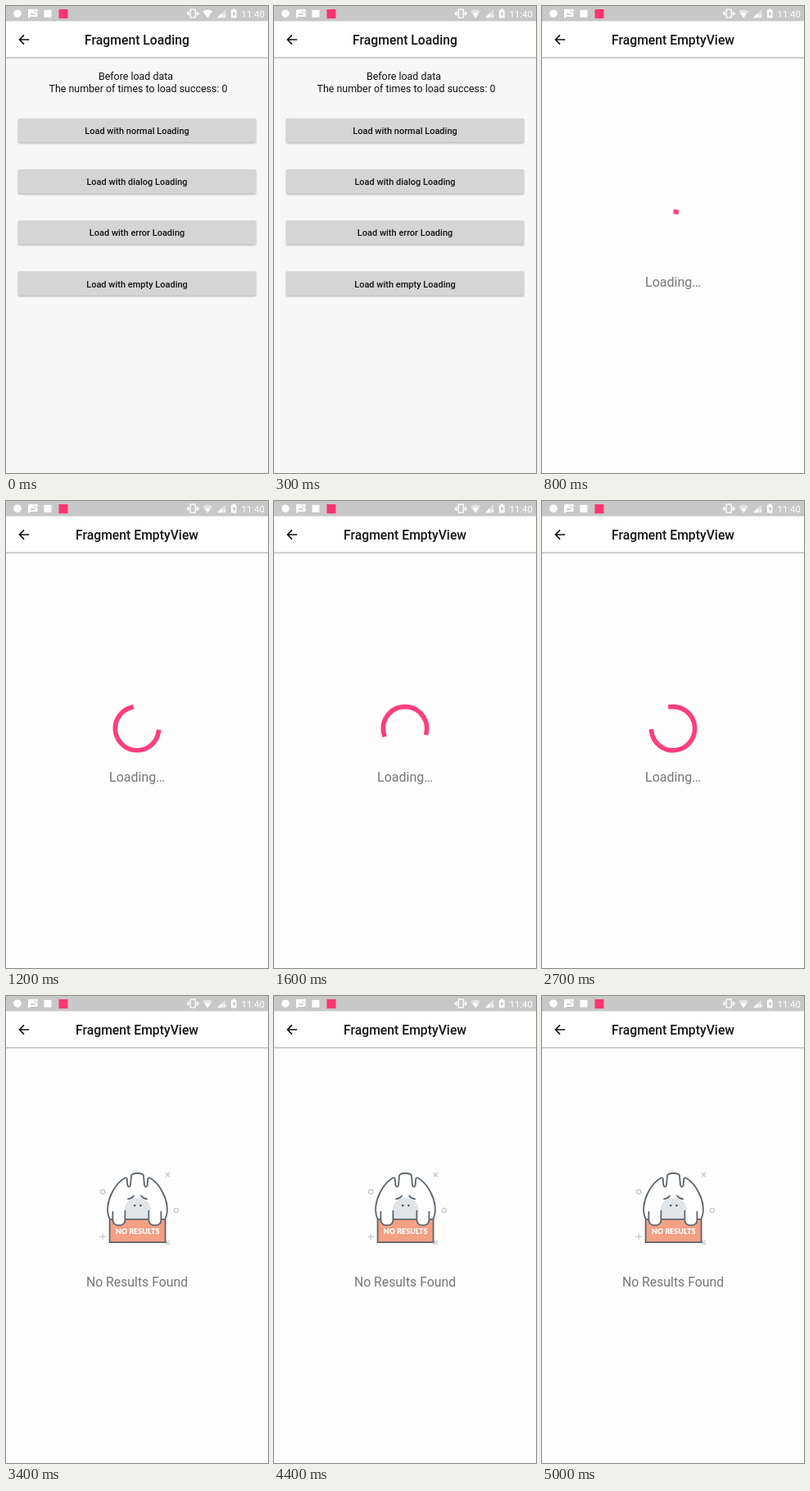
These frames come from a looping animation (320x569 px, 5.1 s). An HTML page:

```html
<!DOCTYPE html>
<html lang="en">
<head>
<meta charset="utf-8">
<title>Loading states</title>
<style>
  html, body { margin: 0; width: 100%; height: 100%; overflow: hidden; background: #fdfdfd; }
  svg { display: block; width: 100vw; height: 100vh; }
  text { font-family: Roboto, sans-serif; text-anchor: middle; }
  .title { font-size: 15.75px; font-weight: 500; fill: #161616; }
  .label { font-size: 11px; font-weight: 500; fill: #151515; }
  .info { font-size: 12.44px; fill: #111; }
  .state { font-size: 16px; fill: #757779; }
  .ink { stroke: #5c656d; stroke-width: 1.8; stroke-linecap: round; stroke-linejoin: round; }
  .deco { fill: none; stroke: #c5c8ca; stroke-width: 1.3; }
</style>
</head>
<body>
<svg viewBox="0 0 320 569" xmlns="http://www.w3.org/2000/svg">
  <defs>
    <filter id="soft" x="-5%" y="-20%" width="110%" height="150%">
      <feGaussianBlur stdDeviation="0.9"/>
    </filter>
  </defs>

  <rect id="page" width="320" height="569" fill="#f7f7f7"/>
  <rect y="18" width="320" height="45" fill="#fff"/>
  <rect y="62.4" width="320" height="1.2" fill="#a9a9a9"/>
  <rect y="63.6" width="320" height="1" fill="#e9e9e9"/>

  <!-- status bar -->
  <rect width="320" height="18.5" fill="#c8c8c8"/>
  <g fill="#fff">
    <circle cx="14" cy="9.2" r="4.8"/>
    <path d="M28 4h6.5v4h4v5H30l-3 2V5q0-1 1-1z"/>
    <circle cx="37" cy="5.6" r="2"/>
    <path d="M29.5 11l2-2.5 1.4 1.5 1.3-1.3 2.3 2.3z" fill="#c8c8c8"/>
    <rect x="46.5" y="4.8" width="9" height="9"/>
    <rect x="64.5" y="4" width="11" height="11.2" fill="#fb3472"/>
    <path d="M225.4 4.2h5.8v10h-5.8zM223.2 6.5v5.4M221.6 7.7v3M233.4 6.5v5.4M235 7.7v3" fill="none" stroke="#fff" stroke-width="1.3"/>
    <path id="wifi" d="M240.3 6.6q5.9-4.4 11.8 0l-5.9 7.8z"/>
    <path id="wifiLow" d="M242.6 9.4q3.6-2.5 7.2 0l-3.6 5z"/>
    <path d="M258 14.2L268.2 4v10.2z" opacity=".45"/>
    <path d="M258 14.2l5.6-5.6v5.6z"/>
    <path d="M265 10.6l3.4 3.4m0-3.4l-3.4 3.4" stroke="#fff" stroke-width="1"/>
    <path d="M275 4.7h2v-1.2h2.6v1.2h2v9.8H275z"/>
    <path d="M279 6.2l-2.3 3.9h1.4v2.9l2.2-4h-1.3z" fill="#b9b9b9"/>
    <text x="301.7" y="13.6" font-size="11.4">11:40</text>
  </g>

  <path d="M28.2 41H16.8M22 35.4L16.5 41l5.5 5.6" fill="none" stroke="#111" stroke-width="1.6"/>
  <text id="title" class="title" x="160" y="46.6"></text>

  <g id="menu">
    <text class="info" x="158.5" y="90">Before load data</text>
    <text class="info" x="161.5" y="104.6">The number of times to load success: 0</text>
  </g>

  <g id="loading">
    <path id="arc" fill="none" stroke="#ff3d7f" stroke-width="5.6" stroke-linecap="square"/>
    <text class="state" x="160" y="341.6">Loading…</text>
  </g>

  <g id="empty">
    <g class="deco">
      <path d="M194.8 215.2l5 5m0-5l-5 5M194.8 298l5 5m0-5l-5 5M118.2 289.4v7.4M114.5 293.1h7.4"/>
      <circle cx="118.2" cy="238.6" r="2.6"/>
      <circle cx="207.8" cy="261.2" r="2.5"/>
    </g>
    <path class="ink" fill="#fff" d="M127.2 273C122.3 264 123.4 251 129.8 239C134 231 140 224.6 145 221.8Q147.6 220.6 147.9 223.6L148.4 230.6Q150.2 234.4 152 230.6L153 219.2Q153.3 216 160.5 216T168 219.2L169 230.6Q170.8 234.4 172.6 230.6L173.1 223.6Q173.4 220.6 176 221.8C181 224.6 187 231 191.2 239C197.6 251 198.7 264 193.8 273z"/>
    <path fill="#e2e5e8" d="M144.5 272V262C144.5 251.5 151.5 246 160.5 246S177 251.5 177 262V272z"/>
    <path class="ink" fill="none" stroke-width="1.6" d="M149 247.4q4.6-.6 7-4M172.2 247.4q-4.6-.6-7-4"/>
    <g fill="#4d565e"><circle cx="157.2" cy="255.2" r="1.3"/><circle cx="164.4" cy="255.2" r="1.3"/></g>
    <rect class="ink" x="126.6" y="272.2" width="68" height="28" fill="#f3a083"/>
    <path class="ink" fill="#fff" d="M130.4 263V273Q130.8 279.4 138 279.4T145.4 273V262"/>
    <path class="ink" fill="#fff" d="M174.4 262V273Q174.8 279.4 182 279.4T189.4 273V263"/>
    <text x="160.6" y="289.6" font-size="9" fill="#fff" style="font-family:Lato,sans-serif;font-weight:900">NO RESULTS</text>
    <text class="state" x="160" y="353.8" style="font-size:15.8px">No Results Found</text>
  </g>
</svg>

<script>
const LOOP = 5100, STEP = 100;
const OPEN = 800, DONE = 2900, WIFI_DROP = 300;
const SPIN_START = 768, CYCLE = 1333, TURN = 4444 / 2;
const CX = 160, CY = 277.2, R = 26.6;

const $ = id => document.getElementById(id);
const show = (id, on) => $(id).setAttribute('visibility', on ? 'visible' : 'hidden');

function add(parent, tag, attrs, text = '') {
  const el = document.createElementNS('http://www.w3.org/2000/svg', tag);
  for (const key in attrs) el.setAttribute(key, attrs[key]);
  el.textContent = text;
  parent.append(el);
}

['normal', 'dialog', 'error', 'empty'].forEach((kind, i) => {
  const y = 137 + i * 62.2;
  const box = { x: 15, width: 290, height: 29.2, rx: 1.2 };
  add($('menu'), 'rect', { ...box, y: y + 1, fill: '#aaa', filter: 'url(#soft)' });
  add($('menu'), 'rect', { ...box, y, fill: '#d5d5d5' });
  add($('menu'), 'text', { class: 'label', x: 160, y: y + 18.9 }, `Load with ${kind} Loading`);
});

// Cubic easing from (0,0) to (1,1), solved by bisection.
function bezier(x1, x2, x) {
  let lo = 0, hi = 1;
  for (let i = 0; i < 24; i++) {
    const s = (lo + hi) / 2, r = 1 - s;
    if (3 * r * r * s * x1 + 3 * r * s * s * x2 + s ** 3 < x) lo = s; else hi = s;
  }
  return lo * lo * (3 - 2 * lo);
}

// The head runs ahead in the first half of a cycle, the tail follows in the second.
const headEase = p => p >= 0.5 ? 1 : bezier(0.4, 0.2, p * 2);
const tailEase = p => p <= 0.5 ? 0 : bezier(0.4, 0.2, p * 2 - 1);

function arcPath(t) {
  const p = t % CYCLE / CYCLE;
  const base = p * 90 + t / TURN * 360;
  const from = base + tailEase(p) * 270;
  const to = Math.max(base + headEase(p) * 270, from + 0.5);
  const point = deg => {
    const a = deg * Math.PI / 180;
    return `${(CX + R * Math.sin(a)).toFixed(3)} ${(CY - R * Math.cos(a)).toFixed(3)}`;
  };
  return `M${point(from)}A${R} ${R} 0 ${to - from > 180 ? 1 : 0} 1 ${point(to)}`;
}

function draw(time) {
  const t = Math.floor(time % LOOP / STEP) * STEP;
  const opened = t >= OPEN, done = t >= DONE;
  show('menu', !opened);
  show('loading', opened && !done);
  show('empty', done);
  $('page').setAttribute('fill', opened ? '#fdfdfd' : '#f7f7f7');
  $('title').textContent = opened ? 'Fragment EmptyView' : 'Fragment Loading';
  $('wifi').setAttribute('opacity', t >= WIFI_DROP ? 0.5 : 1);
  if (opened && !done) $('arc').setAttribute('d', arcPath(t - SPIN_START));
}

const start = performance.now();
function tick() {
  draw(performance.now() - start);
  requestAnimationFrame(tick);
}
tick();
</script>
</body>
</html>
```
